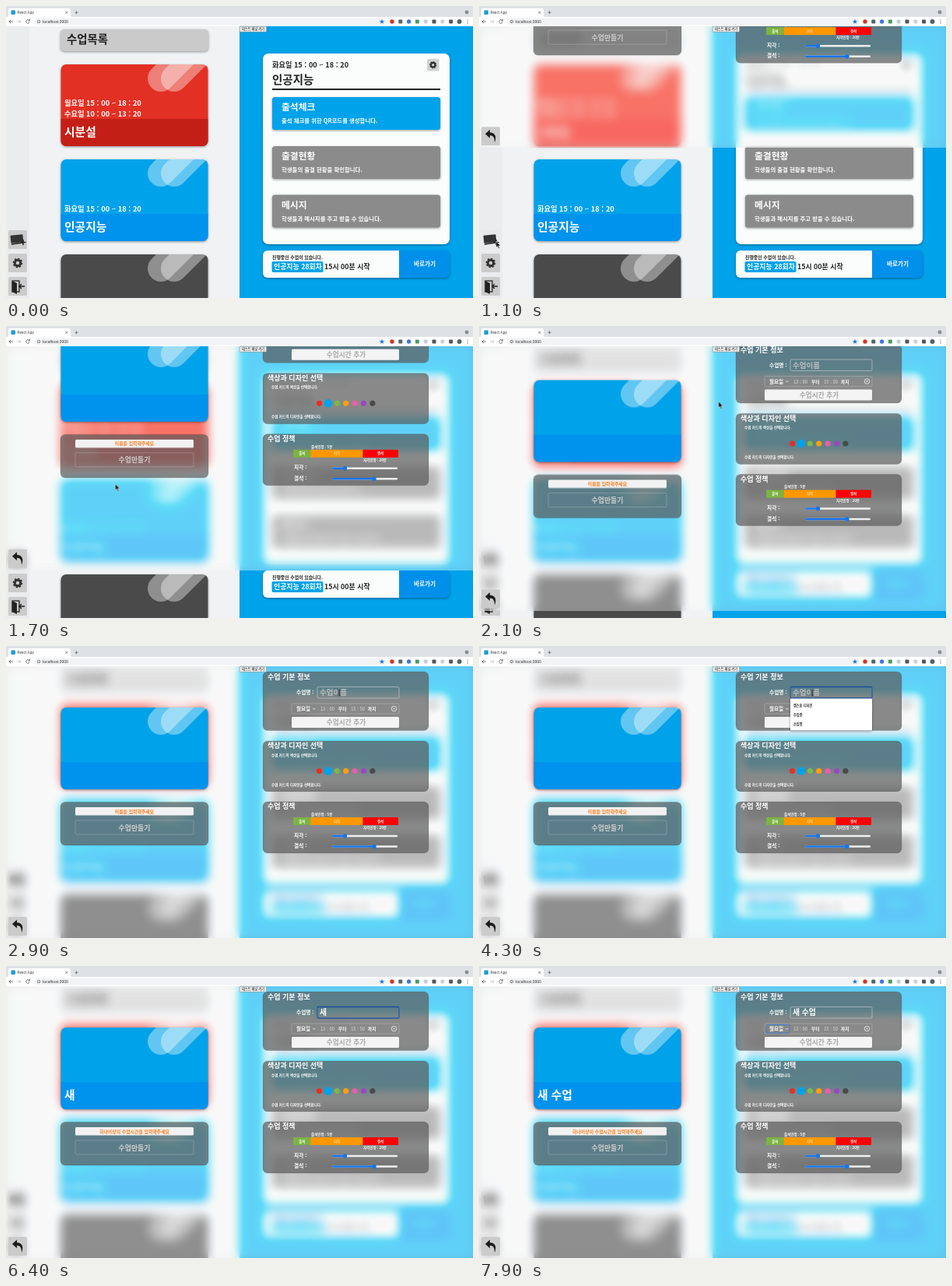
Animation of 600 by 375 pixels, one loop 8 s. Source, as an HTML page:

```html
<!DOCTYPE html>
<html lang="ko">
<head>
<meta charset="utf-8">
<style>
html, body { margin: 0; width: 100%; height: 100%; overflow: hidden; }
#stage { position: absolute; left: 0; top: 0; width: 600px; height: 375px; overflow: hidden; background: #f0f2f4; }
svg { display: block; }
#stage > svg { position: absolute; left: 0; top: 0; }
#glass { position: absolute; left: 0; top: 26px; width: 600px; height: 0; background: rgba(238,238,238,.4);
  -webkit-backdrop-filter: blur(6.5px) saturate(1.5) brightness(1.08); backdrop-filter: blur(6.5px) saturate(1.5) brightness(1.08); }
#clip { position: absolute; left: 0; top: 26px; width: 600px; height: 349px; overflow: hidden; }
text { font-family: "Noto Sans CJK KR", "Noto Sans CJK", "Noto Sans CJK JP", sans-serif; font-weight: 700; white-space: pre; }
text.heavy { font-weight: 900; }
#bar text { font-family: Roboto, "Noto Sans CJK KR", sans-serif; font-weight: 400; }
.lift { filter: drop-shadow(0 1px 1.5px rgba(0,0,0,.4)); }
</style>
</head>
<body>
<div id="stage">
  <svg id="page" width="600" height="375"></svg>
  <div id="glass"></div>
  <div id="clip"><svg id="form" width="600" height="349" viewBox="0 26 600 349"></svg></div>
  <svg id="bar" width="600" height="375"></svg>
</div>
<script>
const LOOP = 8000;
const BLUE = '#00a2ea', GREY = '#8b8b8b', DARK = '#4a4a4a', RED = '#e33024';
const $ = id => document.getElementById(id);

// Drawing helpers
const text = (x, y, size, str, fill = '#fff', extra = '') =>
  `<text x="${x}" y="${y}" font-size="${size}" fill="${fill}" ${size > 11 ? 'class="heavy"' : ''} ${extra}>${str}</text>`;
const mid = (x, y, size, str, fill) => text(x, y, size, str, fill, 'text-anchor="middle"');
const rect = (x, y, w, h, fill, r = 0, extra = '') =>
  `<rect x="${x}" y="${y}" width="${w}" height="${h}" rx="${r}" fill="${fill}" ${extra}/>`;
const dot = (x, y, r, fill, extra = '') => `<circle cx="${x}" cy="${y}" r="${r}" fill="${fill}" ${extra}/>`;
const path = (d, stroke, width = 1, fill = 'none') =>
  `<path d="${d}" stroke="${stroke}" stroke-width="${width}" fill="${fill}"/>`;
const lift = inner => `<g class="lift">${inner}</g>`;
const gear = (x, y, r) => dot(x, y, r * .62, 'none', `stroke="#333" stroke-width="${r * .5}"`) +
  dot(x, y, r * .9, 'none', `stroke="#333" stroke-width="${r * .3}" pathLength="16" stroke-dasharray="1.1 .9"`);

const card = (y, fill, strip, title = '', lines = []) => lift(rect(70.5, y, 189, 105, fill, 7)) +
  `<svg x="70" y="${y}" width="190" height="105">
    <path d="M.5 70h189v28a7 7 0 0 1-7 7h-175a7 7 0 0 1-7-7z" fill="${strip}"/>
    <g stroke="#fff" stroke-opacity=".38" stroke-width="34" stroke-linecap="round">
      <path d="M129 18l60-60"/><path d="M146 18l60-60"/>
    </g></svg>` +
  lines.map((s, i) => text(75, y + 66.5 - 13.5 * (lines.length - 1 - i), 9.25, s)).join('') +
  text(75, y + 92, 14.8, title);

const sideButton = (y, icon, id = '') => `<g>${rect(3, y, 24, 24, '#cbcbcb', 1.5, id && `id="${id}"`)}${icon}</g>`;
const menu = (y, fill, title, note) => lift(rect(342, y, 216, 42, fill, 3.5)) +
  text(354, y + 17, 11.8, title) + text(354, y + 33, 7.4, note);

const board = `<g transform="rotate(-6 14 299)">${rect(6, 294, 16, 10, '#333', .5)}</g>` +
  path('M7 306l14-2M22 300v7M18.5 303.5h7', '#222', 1.6);
const door = rect(8, 353, 9, 14, 'none', 0, 'stroke="#222" stroke-width="1.3"') +
  path('M8 353l6 3v14l-6-3z', 'none', 0, '#222') + path('M24 360h-7m3-3l-3 3 3 3', '#222', 1.4);
const back = path('M8 357l6-5.5v3.5c7 .5 9 6 6 13c0-6-1.500-9-6-9v3.5z', 'none', 0, '#1d1d1d');

$('page').innerHTML =
  rect(0, 26, 30, 349, '#ebecee') +
  lift(rect(70, 30, 190, 28, '#cacaca', 5)) + text(78, 47.5, 14.4, '수업목록', '#222') +
  card(75, RED, '#c41f17', '시분설', ['월요일 15 : 00 ~ 18 : 20', '수요일 10 : 00 ~ 13 : 20']) +
  card(197, BLUE, '#0093ee', '인공지능', ['화요일 15 : 00 ~ 18 : 20']) +
  card(319, DARK, '#3c3c3c') +
  sideButton(288, board, 'add') + sideButton(318, gear(15, 330, 6)) + sideButton(348, door) +
  rect(300, 26, 300, 349, BLUE) +
  lift(rect(330, 61, 240, 245, '#fbfcfc', 7)) +
  text(342, 79, 9.2, '화요일 15 : 00 ~ 18 : 20', '#222') + text(342, 100, 14.5, '인공지능', '#222') +
  rect(541, 68, 15.5, 15.5, '#d2d2d2', 1.5) + gear(548.7, 75.7, 4.4) +
  rect(342, 106, 216, 2, '#222') +
  menu(117, BLUE, '출석체크', '출석 체크를 위한 QR코드를 생성합니다.') +
  menu(180, GREY, '출결현황', '학생들의 출결 현황을 확인합니다.') +
  menu(242.5, GREY, '메시지', '학생들과 메시지를 주고 받을 수 있습니다.') +
  lift(rect(330, 314, 240, 35, '#0090ec', 6)) +
  path('M336 314h169v35h-169a6 6 0 0 1-6-6v-23a6 6 0 0 1 6-6z', 'none', 0, '#fbfcfc') +
  text(342, 325, 5.9, '진행중인 수업이 있습니다.', '#222') +
  rect(341.5, 328, 66, 14, BLUE, 2) + text(344, 338, 8.9, '인공지능 28회차') +
  text(409, 338, 8.9, '15시 00분 시작', '#222') + mid(538, 334, 7.6, '바로가기');

// Form that slides down over the page
const panel = (x, y, w, h) =>
  rect(x, y, w, h, 'rgba(90,90,90,.7)', 6, 'stroke="#000" stroke-opacity=".12"');
const outline = (x, y, w, h, color, width = .6) =>
  rect(x, y, w, h, 'none', 1.5, `stroke="${color}" stroke-width="${width}"`);
const slider = (y, x) => rect(419, y - 1.2, 84, 2.4, '#efefef', 1.2) +
  rect(419, y - 1.2, x - 419, 2.4, '#1a73e8', 1.2) + dot(x, y, 2.7, '#1a73e8');
const swatches = [RED, BLUE, '#7cb84a', '#ff9f0a', '#e85fa8', '#9c46c0', DARK];

// Text of the name field: [string, from, to]
const typed = [
  ['ㅅ', 5600, 5800], ['새', 5800, 6600], ['새 ㅅ', 6600, 6800], ['새 수', 6800, 7000],
  ['새 숭', 7000, 7100], ['새 수어', 7100, 7300], ['새 수업', 7300, LOOP]
];
const timed = (from, to, inner) => `<g class="timed" data-from="${from}" data-to="${to}">${inner}</g>`;
const FOCUS = 3400, TYPE = 5600, BLUR = 7600;

$('form').innerHTML =
  card(79, BLUE, '#0093ee') +
  panel(70, 200.5, 190, 55.5) + rect(89, 207, 152, 10.5, '#f2f2f2', 1.5) +
  timed(0, TYPE, mid(165, 214.5, 5.9, '이름을 입력해주세요', '#ff7a1a')) +
  timed(TYPE, LOOP, mid(165, 214.5, 5.9, '하나이상의 수업시간을 입력해주세요', '#ff7a1a')) +
  outline(89, 224, 152, 18, 'rgba(255,255,255,.35)') + mid(165, 236.5, 8.9, '수업만들기', '#cdcdcd') +
  `<g>${rect(3, 348, 24, 24, '#cbcbcb', 1.5)}${back}</g>` +

  panel(330, 33, 213, 75.5) + text(336, 43, 9, '수업 기본 정보') + text(373, 62, 6.7, '수업명 :') +
  outline(400, 52.5, 105, 14.5, '#d0d0d0') +
  timed(0, TYPE, text(403, 63.2, 9.5, '수업이름', '#bdbdbd')) +
  outline(367, 74, 138, 13, 'rgba(255,255,255,.35)') +
  text(373, 83, 6.5, '월요일') + path('M394 79.8l1.7 1.7 1.7-1.7', '#fff', .8) +
  text(404, 83, 5.6, '13 : 00', '#c4c4c4') + text(427, 83, 5.6, '부터') +
  text(443, 83, 5.6, '15 : 50', '#c4c4c4') + text(465, 83, 5.6, '까지') +
  dot(498.5, 80.5, 3.3, 'none', 'stroke="#fff" stroke-width=".7"') +
  path('M497.3 79.3l2.4 2.4m0-2.4l-2.4 2.4', '#fff', .7) +
  rect(367, 91, 138, 14, '#f4f4f4', 1.5) + mid(437, 101.3, 8.7, '수업시간 추가', '#a8a8a8') +

  panel(330, 122, 213, 65) + text(336, 131, 9, '색상과 디자인 선택') +
  text(341, 141.5, 4.6, '수업 카드의 색상을 선택합니다.') +
  swatches.map((c, i) => dot(402.5 + 11.4 * i, 160.5, i === 1 ? 5.3 : 3.6, c)).join('') +
  text(341, 179.5, 4.6, '수업 카드의 디자인을 선택합니다.') +

  panel(330, 200, 213, 66) + text(336, 209, 9, '수업 정책') +
  text(392, 217.8, 4.5, '출석인정 : 5분') + text(459, 235, 4.5, '지각인정 : 20분') +
  rect(369, 220, 22.5, 10, '#7cb342') + rect(391.5, 220, 67, 10, '#ff9800') + rect(458.5, 220, 45.5, 10, '#fb0000') +
  mid(380.3, 226.6, 4.4, '출석') + mid(425, 226.6, 4.4, '지각', '#ffd9a0') + mid(481, 226.6, 4.4, '결석') +
  text(370, 245.5, 6.7, '지각 :') + slider(244, 435.5) +
  text(370, 259, 6.7, '결석 :') + slider(257.5, 473) +

  timed(FOCUS, BLUR, outline(400, 52.5, 105, 14.5, '#1b4f9c', 1.3)) +
  timed(BLUR, LOOP, outline(369, 75.5, 30, 10.5, '#3f7fd0', 1)) +
  typed.map(([s, from, to]) =>
    timed(from, to, text(403, 63.2, 9.8, s) + text(75, 171, 14.8, s))).join('') +
  timed(FOCUS, TYPE, lift(rect(400, 67.5, 105, 41, '#fff', 1)) +
    ['캡스톤 디자인', '수업중', '수업명'].map((s, i) => text(404, 77.6 + 12 * i, 4.2, s, '#222')).join(''));

// Browser frame, floating button and pointer
const extensions = ['#d93025', '#59616b', '#3b78e7', '#4b9c6b', '#c9ced6', '#555', '#cfd2d6', '#555'];
$('bar').innerHTML =
  rect(0, 0, 600, 15, '#dee1e6') + rect(0, 14, 600, 12, '#fff') +
  path('M1 14q2 0 2-2v-7q0-2 2-2h76q2 0 2 2v7q0 2 2 2z', 'none', 0, '#fff') +
  rect(6.5, 5.5, 5.5, 5.5, '#1e9be0', 1) + text(14.5, 10, 4.7, 'React App', '#444') +
  path('M76.3 7l2.8 2.8m0-2.8l-2.8 2.8M88.5 8.3h4m-2-2v4', '#555', .7) +
  dot(592, 8, 2.4, '#8a8d91') +
  path('M9 20h-5m2.2-2.2l-2.2 2.2 2.2 2.2', '#555', .8) +
  path('M14 20h5m-2.2-2.2l2.2 2.2-2.2 2.2', '#bbb', .8) +
  path('M30 18.5a2.3 2.3 0 1 0 .4 2M30.5 17v2h-2', '#555', .8) +
  rect(36, 15.5, 453, 9, '#f1f3f4', 4.5) + dot(42, 20, 1.8, 'none', 'stroke="#666" stroke-width=".7"') +
  path('M42 19.7v1.3', '#666', .6) +
  text(47, 21.8, 5, 'localhost:3000', '#333') +
  path('M483 17l.9 2 2.1.2-1.6 1.4.5 2.1-1.9-1.1-1.9 1.1.5-2.1-1.6-1.4 2.1-.2z', 'none', 0, '#1a73e8') +
  extensions.map((c, i) => i % 2 ? rect(493.5 + 10.8 * i, 17.5, 5, 5, c, 1) : dot(496 + 10.8 * i, 20, 2.7, c)).join('') +
  dot(582.5, 20, 3, '#55636e') + [17.8, 20, 22.2].map(y => dot(593, y, .6, '#555')).join('') +
  rect(300.2, 26.3, 34.5, 7, '#efefef', .8, 'stroke="#777" stroke-width=".5"') +
  mid(317.5, 31.4, 4.2, '테스트 패널 켜기', '#111') +
  `<g id="pointer">
    ${timed(0, 2900, '<path d="M0 0v8l1.8-1.6 1.4 3 1.3-.6-1.4-2.9h2.5z" fill="#111" stroke="#fff" stroke-width=".5"/>')}
    ${timed(2900, TYPE, '<path d="M-1.5-4q1.5 0 1.5 1v6q0 1-1.5 1m3-8q-1.5 0-1.5 1v6q0 1 1.5 1" fill="none" stroke="#222" stroke-width=".8"/>')}
  </g>`;

// Motion
const play = (el, frames) => el.animate(frames, { duration: LOOP, iterations: Infinity });
const at = ms => ms / LOOP;

const slideFrom = 572, slideTo = 2325;
const slide = (el, prop, start, end) => play(el, [
  { offset: 0, [prop]: start },
  { offset: at(slideFrom), [prop]: start, easing: 'ease-out' },
  { offset: at(slideTo), [prop]: end },
  { offset: 1, [prop]: end }
]);
slide($('glass'), 'height', '0px', '349px');
slide($('form'), 'transform', 'translateY(-349px)', 'translateY(0px)');

const showBetween = (el, from, to) => play(el,
  [[0, 0], [from, 1], [to, 0], [LOOP, 0]].map(([ms, opacity]) => ({ offset: at(ms), opacity, easing: 'step-end' })));
document.querySelectorAll('.timed').forEach(el => showBetween(el, +el.dataset.from, +el.dataset.to));

play($('add'), [
  { offset: 0, fill: '#cbcbcb' }, { offset: at(350), fill: '#cbcbcb' },
  { offset: at(500), fill: '#e8e9eb' }, { offset: at(1250), fill: '#e8e9eb' },
  { offset: at(1400), fill: '#cbcbcb' }, { offset: 1, fill: '#cbcbcb' }
]);

const route = [[0, 77, 306], [200, 77, 306], [500, 22, 302], [1150, 22, 302], [1700, 140, 203],
  [2100, 307.5, 97], [2500, 400, 70], [2900, 428, 60], [LOOP, 428, 60]];
play($('pointer'), route.map(([ms, x, y]) => ({ offset: at(ms), transform: `translate(${x}px, ${y}px)` })));
</script>
</body>
</html>
```
